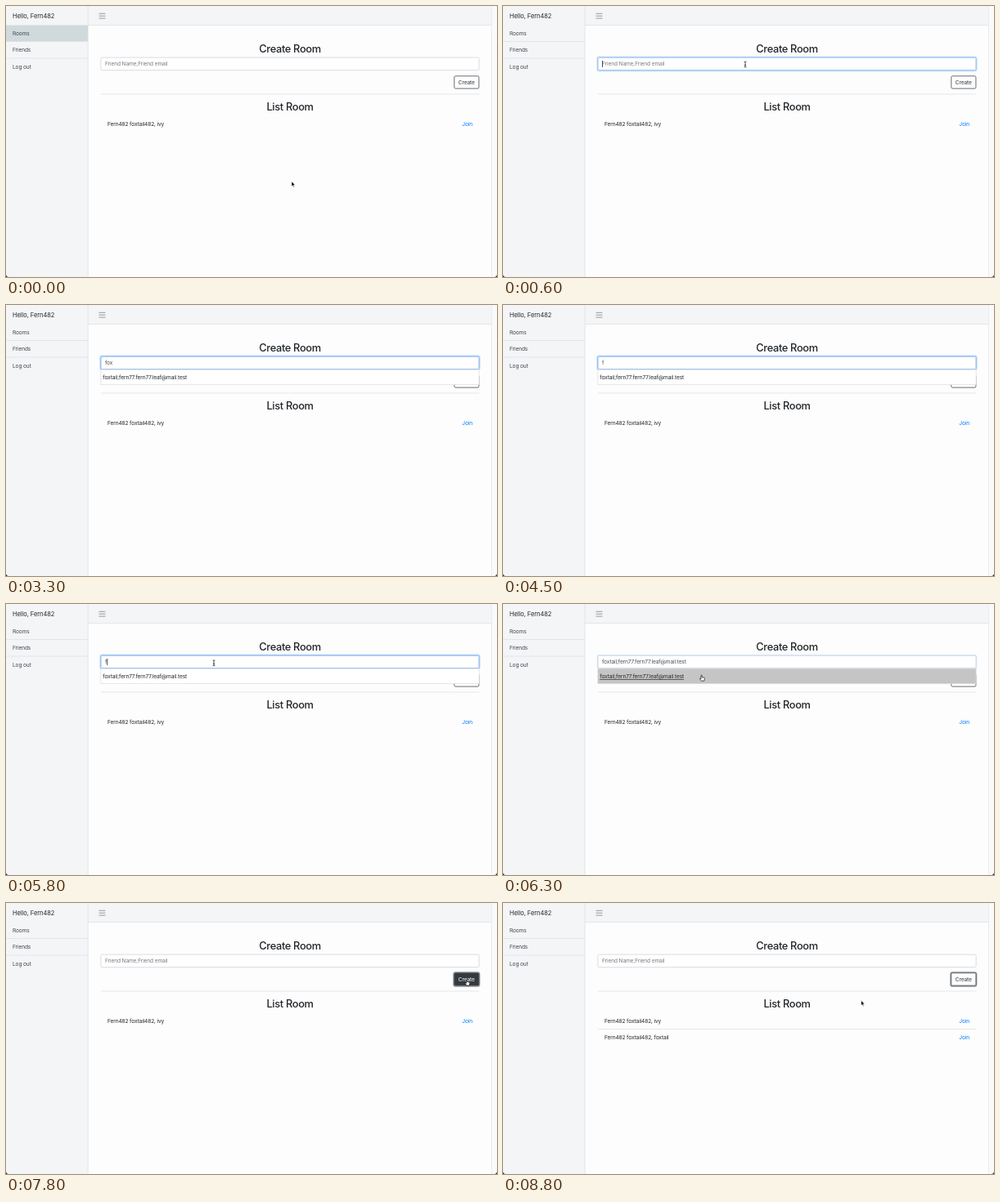
Animation of 600 by 332 pixels, one loop 9.9 s. Source, as an HTML page:

```html
<!DOCTYPE html>
<html lang="en">
<head>
<meta charset="utf-8">
<title>Create Room</title>
<style>
  html, body { margin: 0; width: 100%; height: 100%; overflow: hidden; background: #fdfdfd; }
  svg { display: block; width: 100%; height: 100%; }
  text { font: 400 6.6px Inter, Roboto, sans-serif; letter-spacing: -0.02em; fill: #212529; }
  .hello { font-size: 7.5px; letter-spacing: -0.01em; }
  .title { font-size: 12.8px; font-weight: 500; letter-spacing: -0.025em; text-anchor: middle; }
  .nav { fill: #3f464c; }
  .link { fill: #007bff; text-anchor: end; }
  .line { fill: none; stroke: #dfe1e3; stroke-width: .8; }
</style>
</head>
<body>
<svg viewBox="0 0 600 332" preserveAspectRatio="none">
  <rect width="600" height="332" fill="#fdfdfd"/>
  <rect x="100" width="494" height="23.5" fill="#f4f5f7"/>
  <path class="line" d="M100 23.5H593.5"/>
  <rect width="100" height="332" fill="#f4f5f7"/>
  <rect id="active" y="23.5" width="100" height="20" fill="#d0d9dc"/>
  <path class="line" d="M0 43.5H100M0 64H100M100.2 0V332"/>
  <rect x="593.5" width="6.5" height="332" fill="#fafafa"/>
  <path d="M593.5 0V332" stroke="#e9e9e9" stroke-width=".8"/>
  <text class="hello" x="8" y="14.5">Hello, Fern482</text>
  <text class="nav" x="8" y="36">Rooms</text>
  <text class="nav" x="8" y="56.4">Friends</text>
  <text class="nav" x="8" y="76.8">Log out</text>
  <path d="M113.5 9.3h8M113.5 12.2h8M113.5 15.1h8" stroke="#808285" stroke-width=".8"/>

  <text class="title" x="347" y="56.6">Create Room</text>
  <rect id="ring" x="115.2" y="62.4" width="463.6" height="17.2" rx="2" fill="none" stroke="#bfdeff" stroke-width="1.6"/>
  <rect x="115.9" y="63.1" width="462.2" height="15.6" rx="1.5" fill="#fff" stroke="#ced4da" stroke-width=".8"/>
  <rect id="focus" x="115.9" y="63.1" width="462.2" height="15.6" rx="1.5" fill="none" stroke="#80b1f5" stroke-width=".9"/>
  <text id="field" x="121" y="73.4"></text>
  <rect id="caret" y="67" width=".8" height="8" fill="#222"/>

  <rect id="buttonRing" x="547" y="85" width="31.6" height="17" rx="2.2" fill="none" stroke="#8f9396" stroke-width="1.5"/>
  <rect id="button" x="547.8" y="85.8" width="30.1" height="15.3" rx="1.6" stroke="#454b50" stroke-width=".8"/>
  <text id="label" x="562.8" y="95.9" text-anchor="middle">Create</text>
  <g id="menu">
    <rect id="option" x="115.9" y="79.2" width="462.2" height="18.5" stroke="#dcdcdc" stroke-width=".7"/>
    <text id="choice" x="118.3" y="91"></text>
  </g>
  <path class="line" d="M116 108H578.5"/>
  <text class="title" x="347" y="127.9">List Room</text>
  <text x="124" y="147">Fern482 foxtail482, ivy</text>
  <text class="link" x="570" y="147">Join</text>
  <g id="row">
    <path class="line" d="M116 154.6H578.5"/>
    <text x="124" y="167.3">Fern482 foxtail482, foxtail</text>
    <text class="link" x="570" y="167.3">Join</text>
  </g>

  <path d="M0 328.5A3.5 3.5 0 0 0 3.5 332H0ZM600 328.5A3.5 3.5 0 0 1 596.5 332H600Z" fill="#111"/>

  <g id="arrow">
    <path d="M0 0V6L1.4 4.7L2.3 6.8L3.3 6.4L2.4 4.3H4.3Z" fill="#000" stroke="#fff" stroke-width=".5"/>
  </g>
  <g id="beam" fill="none" stroke="#222" stroke-width=".8">
    <path d="M-1.4 -3.5Q0 -3.5 0 -2.6Q0 -3.5 1.4 -3.5M0 -2.6V2.6M-1.4 3.5Q0 3.5 0 2.6Q0 3.5 1.4 3.5M-.9 .9H.9"/>
  </g>
  <g id="hand">
    <path d="M-.6 .3Q0 -.4 .6 .3V2.6L3.2 3.1Q3.9 3.3 3.8 4.2L3.2 7H-.2L-2.1 4.5Q-2 3.7 -1.4 4L-.6 4.6Z" fill="#fff" stroke="#111" stroke-width=".7" stroke-linejoin="round"/>
  </g>
</svg>
<script>
const LOOP = 9900, STEP = 100;
const contact = 'foxtail;fern77.fern77.leaf@mail.test';
const el = {};
for (const node of document.querySelectorAll('[id]')) el[node.id] = node;
el.choice.textContent = contact;

const typed = [[0, ''], [1400, 'f'], [1500, 'fo'], [1800, 'fox'], [3600, 'fo'],
  [3800, 'f'], [6200, contact], [7700, '']];
const caretOn = [[500, 1000], [1400, 2300], [2800, 3300], [3800, 4300], [4800, 5300], [5800, 6200]];
const menuOn = [[2400, 3600], [4500, 6400]];
const pointer = [
  [0, 'arrow'], [300, 'beam'], [1400, ''], [5500, 'beam'], [6000, 'hand'],
  [6400, 'arrow'], [7300, 'hand'], [8000, 'arrow']
];
// time, x, y of the pointer's hot spot
const path = [
  [0, 349, 215], [100, 332, 165], [200, 306, 98], [300, 296, 71.5], [5500, 296, 71.5],
  [5800, 254, 72.3], [5900, 253, 73.5], [6100, 244, 86], [6300, 242.6, 87.2],
  [6400, 242.6, 86], [6500, 242.6, 86], [6800, 370, 104], [7000, 482, 109.5],
  [7200, 555, 101], [7500, 563, 94], [7900, 563, 94], [8100, 492, 113],
  [8300, 439.3, 121], [8500, 439.3, 121], [8800, 437.7, 119.5]
];

const latest = (list, t) => list.filter(k => k[0] <= t).pop()[1];
const within = (spans, t) => spans.some(([a, b]) => t >= a && t < b);
const show = (node, on) => node.setAttribute('visibility', on ? 'visible' : 'hidden');
const ramp = (t, a, b) => Math.max(0, Math.min(1, (t - a) / (b - a)));

function position(t) {
  const i = path.findIndex(k => k[0] > t);
  if (i < 0) return path[path.length - 1].slice(1);
  const [a, b] = [path[i - 1], path[i]];
  const u = ramp(t, a[0], b[0]);
  return [1, 2].map(n => a[n] + (b[n] - a[n]) * u);
}

function render(time) {
  const t = Math.floor((time % LOOP) / STEP) * STEP;
  const value = latest(typed, t);

  show(el.active, t < 500);
  el.field.textContent = value || 'Friend Name;Friend email';
  el.field.style.fill = value ? '#495057' : '#747c83';
  const width = value ? el.field.getComputedTextLength() : 0;
  el.caret.setAttribute('x', 121.1 + width);
  show(el.caret, within(caretOn, t));

  const focus = ramp(t, 400, 650) * (1 - ramp(t, 6150, 6350));
  el.ring.setAttribute('opacity', focus);
  el.focus.setAttribute('opacity', focus);

  show(el.menu, within(menuOn, t));
  const over = t >= 6000 && t < 6400;
  el.option.setAttribute('fill', over ? '#c5c5c5' : '#fff');
  el.choice.style.textDecoration = over ? 'underline' : 'none';

  const pressed = t >= 7300 && t < 8000;
  el.button.setAttribute('fill', pressed ? '#343a40' : '#fdfdfd');
  el.label.style.fill = pressed ? '#fff' : '#343a40';
  show(el.buttonRing, t >= 7600);
  show(el.row, t >= 8100);

  const kind = latest(pointer, t);
  const [x, y] = position(t);
  for (const name of ['arrow', 'beam', 'hand']) {
    show(el[name], name === kind);
    el[name].setAttribute('transform', `translate(${x} ${y})`);
  }
}

const start = performance.now();
function tick() {
  render(performance.now() - start);
  requestAnimationFrame(tick);
}
tick();
</script>
</body>
</html>
```
